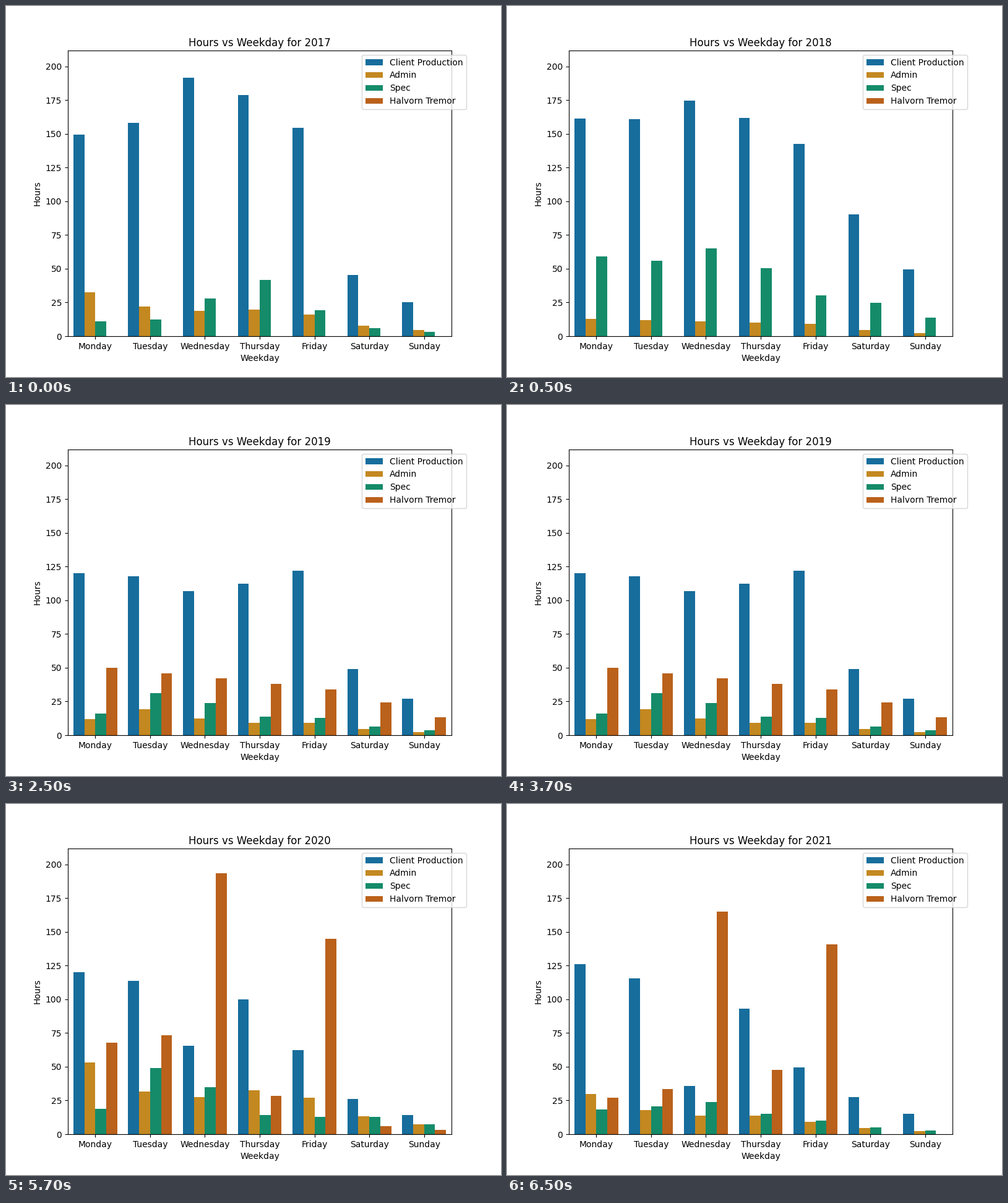
Recreate the animation shown at these times as a matplotlib script. Size 800 by 600 pixels, loop 8 s.

```python
import colorsys

import matplotlib.pyplot as plt
import numpy as np
from matplotlib.animation import FuncAnimation
from matplotlib.colors import to_rgb

DAYS = ["Monday", "Tuesday", "Wednesday", "Thursday", "Friday", "Saturday", "Sunday"]
PROJECTS = ["Client Production", "Admin", "Spec", "Halvorn Tremor"]
BASE_COLORS = ["#0173B2", "#DE8F05", "#029E73", "#D55E00"]
BAR_WIDTH = 0.2
PIXEL = 0.72  # points per pixel at 100 dpi


def week(monday=0, friday=0, peak=0, day=2.3, booked=0, weekend=0.5):
    """Linear trend over the workdays with one smooth peak around `day`.

    `booked` hours come on top on Wednesday and Friday; the weekend starts
    at a share of the Friday trend and falls off on Sunday.
    """
    d = np.arange(5)
    work = np.linspace(monday, friday, 5) + peak * np.exp(-((d - day) ** 2))
    work[[2, 4]] += booked
    saturday = weekend * friday
    return [*work, saturday, 0.55 * saturday]


# One week per project
HOURS = {
    2017: [week(149, 152, 45, weekend=0.3), week(34, 16, -9, 1.4),
           week(11, 12, 31, 2.8), week()],
    2018: [week(161, 141, 26, weekend=0.64), week(13, 9),
           week(59, 29, 23, weekend=0.85), week()],
    2019: [week(120, 123, -16, weekend=0.4), week(8, 9, 11, 1),
           week(12, 13, 20, 1.25), week(50, 34, weekend=0.72)],
    2020: [week(120, 100, -8, booked=-37, weekend=0.26), week(56, 27, -20, 1.4),
           week(10, 13, 41, 1.25, weekend=1), week(65, 12, 28, 1.5, booked=133)],
    2021: [week(126, 105, -28, booked=-54, weekend=0.26), week(31, 9, -9, 1.4),
           week(18, 10, 10, 1.9), week(27, 30, 30, booked=109, weekend=0)],
}
YEARS = list(HOURS)


def desaturate(color, amount=0.75):
    h, l, s = colorsys.rgb_to_hls(*to_rgb(color))
    return colorsys.hls_to_rgb(h, l, s * amount)


plt.rcParams["font.family"] = "DejaVu Sans"
fig, ax = plt.subplots(figsize=(8, 6), dpi=100)
groups = []
for i, (project, color) in enumerate(zip(PROJECTS, BASE_COLORS)):
    xs = np.arange(len(DAYS)) + (i - 1.5) * BAR_WIDTH
    groups.append(ax.bar(xs, 0, BAR_WIDTH, color=desaturate(color), label=project))

ax.set_xlim(-0.5, len(DAYS) - 0.5)
ax.set_ylim(0, 211.75)
ax.set_xticks(range(len(DAYS)), DAYS)
ax.set_xlabel("Weekday")
ax.set_ylabel("Hours", labelpad=4 + PIXEL)
title = ax.set_title("", pad=6 - PIXEL)
ax.legend(loc="upper right", bbox_to_anchor=(1.05, 1))


def update(frame):
    # The first year shows for one step, each later one for up to four
    year = YEARS[(frame + 3) // 4]
    title.set_text(f"Hours vs Weekday for {year}")
    for bars, hours in zip(groups, HOURS[year]):
        for bar, value in zip(bars, hours):
            bar.set_height(value)
            bar.set_visible(value > 0)


anim = FuncAnimation(fig, update, frames=16, interval=500, repeat=True, repeat_delay=0)
plt.show()
```
